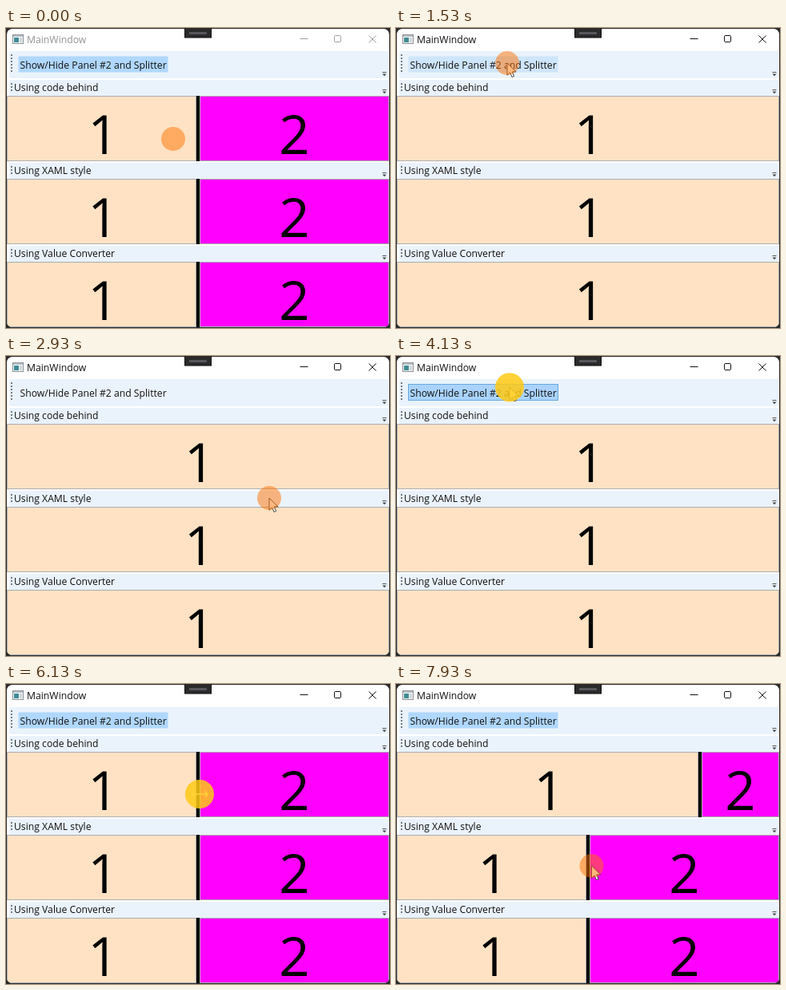
These frames come from a looping animation (480 by 376 pixels, 8000 ms). An HTML page:

```html
<!DOCTYPE html>
<html lang="en">
<head>
<meta charset="utf-8">
<title>MainWindow</title>
<style>
  html, body { margin: 0; width: 100%; height: 100%; overflow: hidden; background: #2b2b2b; }
  svg { display: block; }
  text { font: 12.2px "Open Sans", "Noto Sans", sans-serif; fill: #111; }
  .digit { font-size: 67px; text-anchor: middle; fill: #000; }
  .bar { fill: #eaf3fc; }
  .one { fill: #fee2c3; stroke: #abadb3; }
  .two { fill: #f0f; stroke: #abadb3; }
  .line { fill: none; stroke: currentColor; }
</style>
</head>
<body>
<svg id="stage" width="480" height="376" viewBox="0 0 480 376">
  <defs><clipPath id="frame"><rect x="1" y="1" width="478" height="374" rx="7"/></clipPath></defs>
  <rect width="480" height="376" fill="#2b2b2b"/>
  <g clip-path="url(#frame)">
    <rect width="480" height="376" fill="#fff"/>
    <g id="icon">
      <rect x="8.5" y="8.5" width="13" height="11" fill="#f4f6f7" stroke="#8b9196"/>
      <rect x="9" y="9" width="12" height="2" fill="#b9c0c5"/>
      <rect x="10" y="12" width="6" height="6" fill="#3f8c94"/>
      <rect x="17" y="12" width="3" height="6" fill="#cfd6da"/>
    </g>
    <text id="title" x="26" y="19">MainWindow</text>
    <g id="controls">
      <path class="line" d="M367.5 13.5h10"/>
      <rect class="line" x="410.5" y="9.5" width="8" height="8" rx="1.2"/>
      <path class="line" d="M453.5 9.5l9 9m0-9l-9 9"/>
    </g>
    <g id="bars"></g>
    <rect id="button" x="15.5" y="35.5" width="187" height="20"/>
    <text x="17.5" y="50.5">Show/Hide Panel #2 and Splitter</text>
    <g id="rows"></g>
  </g>
  <rect x="223.5" y="-1" width="33" height="13" fill="#2a2a2b" stroke="#111"/>
  <rect x="229" y="5" width="22" height="3" fill="#58585c"/>
  <g id="pointer">
    <path id="arrow" d="M0 0v15.2l3.6-3.3 2.4 5.6 2.6-1.1-2.4-5.5h4.9z" fill="#fff" stroke="#333" stroke-width=".9"/>
    <path id="resize" class="line" d="M-10 0h20M-6.5-3.5L-10 0l3.5 3.5M6.5-3.5L10 0 6.5 3.5" color="#fff" stroke-width="1.6"/>
    <path id="beam" class="line" d="M-3-7.5h6M0-7.5v15M-3 7.5h6" color="#fff" stroke-opacity=".25"/>
    <circle id="halo"/>
  </g>
</svg>
<script>
const LOOP = 8000;
const $ = id => document.getElementById(id);
const set = (el, attrs) => { for (const k in attrs) el.setAttribute(k, attrs[k]); };
const show = (el, on) => set(el, { visibility: on ? "visible" : "hidden" });

// time, x, y
const path = [
  [0, 209, 139], [200, 203, 132], [800, 141, 46], [1000, 139, 44], [1730, 139, 44],
  [2200, 236, 122], [2600, 318, 176], [2930, 329, 178], [3130, 327, 177],
  [3800, 143, 42], [4000, 142, 39], [4400, 142, 40], [4730, 164, 107],
  [5400, 238, 136], [5600, 242, 138], [6200, 242, 138], [6930, 382, 138],
  [7200, 382, 138], [7800, 248, 226], [7930, 244.5, 228], [8000, 244, 229]
];
const presses = [[1130, 1330], [4000, 4330], [6000, 7130]];
const [hideAt, showAt] = [1330, 4330];
const dragFrom = 242, splitHome = 240;

// The three sections repeat at a fixed pitch.
const PITCH = 104, PANEL_TOP = 85, PANEL_H = 81;
const labels = ["Using code behind", "Using XAML style", "Using Value Converter"];
const bars = [
  { y: 29, h: 34, dots: 6 },
  ...labels.map((label, i) => ({ y: 65 + i * PITCH, h: 20, dots: 3, label }))
];

function barMarkup({ y, h, dots, label }) {
  const end = y + h;
  const dotMarks = Array.from({ length: dots }, (_, i) =>
    `<rect x="6" y="${y + 4 + i * 4}" width="2" height="2" fill="#777d85"/>`).join("");
  return `<rect class="bar" x="4" y="${y}" width="474" height="${h}" rx="2"/>${dotMarks}
    <path d="M470.5 ${end - 7.5}h5" stroke="#555"/>
    <path d="M470.5 ${end - 5.5}h5l-2.5 2.7z" fill="#444"/>
    ${label ? `<text x="10" y="${y + 14}">${label}</text>` : ""}`;
}
$("bars").innerHTML = bars.map(barMarkup).join("");

const rows = labels.map((_, i) => {
  const g = document.createElementNS("http://www.w3.org/2000/svg", "g");
  const y = PANEL_TOP + i * PITCH, base = y + 73;
  g.innerHTML = `<rect class="one" x="1.5" y="${y + .5}" height="${PANEL_H}"/>
    <text class="digit" y="${base}">1</text>
    <g><rect class="two" y="${y + .5}" height="${PANEL_H}"/>
    <text class="digit" y="${base}">2</text>
    <rect y="${y}" width="4" height="${PANEL_H + 1}"/></g>`;
  $("rows").append(g);
  const [one, digit1, side] = g.children;
  const [two, digit2, splitter] = side.children;
  return { one, digit1, side, two, digit2, splitter };
});

function drawRow(row, split, shown) {
  const right = shown ? split - 2 : 479;
  set(row.one, { width: right - 2 });
  set(row.digit1, { x: (right + 1) / 2 + 2 });
  show(row.side, shown);
  set(row.two, { x: split + 2.5, width: 476 - split });
  set(row.digit2, { x: (split + 481) / 2 });
  set(row.splitter, { x: split - 2 });
}

function cursorAt(t) {
  const i = Math.max(1, path.findIndex(p => p[0] >= t));
  const [t0, x0, y0] = path[i - 1], [t1, x1, y1] = path[i];
  const k = (t - t0) / (t1 - t0), e = k * k * (3 - 2 * k);
  return [x0 + (x1 - x0) * e, y0 + (y1 - y0) * e];
}

function drawPointer(x, y, splits, shown, pressed) {
  const offset = y - PANEL_TOP;
  const split = splits[Math.floor(offset / PITCH)];
  const inPanel = offset > 0 && offset % PITCH < PANEL_H;
  const onSplitter = shown && inPanel && Math.abs(x - split) < 4;
  const onText = inPanel && !onSplitter && (!shown || x < split);
  set($("pointer"), { transform: `translate(${x} ${y})` });
  show($("arrow"), !onSplitter && !onText);
  show($("resize"), onSplitter);
  show($("beam"), onText);
  set($("halo"), pressed
    ? { r: 18, fill: "#ffcb14", "fill-opacity": .85 }
    : { r: 15, fill: "#ff7200", "fill-opacity": .5 });
}

function draw(t) {
  const [x, y] = cursorAt(t);
  const shown = t < hideAt || t >= showAt;
  const pressed = presses.some(([a, b]) => t >= a && t < b);
  const active = t >= presses[0][0];
  const [dragStart, dragEnd] = presses[2];
  const dragX = t < dragStart ? dragFrom : cursorAt(Math.min(t, dragEnd))[0];
  const splits = [splitHome + dragX - dragFrom, splitHome, splitHome];

  rows.forEach((row, i) => drawRow(row, splits[i], shown));

  set($("title"), { style: `fill:${active ? "#111" : "#939393"}` });
  set($("controls"), { color: active ? "#111" : "#a0a0a0" });

  const hover = x > 15 && x < 203 && y > 35 && y < 57;
  const down = hover && (pressed || shown);
  const fill = down ? "#a9d3fd" : shown ? "#b0d7fd" : hover ? "#cee5fa" : "none";
  set($("button"), { fill, stroke: down ? "#69a8df" : "none" });

  drawPointer(x, y, splits, shown, pressed);
}

// The picture advances in uneven steps of 130 and 70 ms.
const step = t => t - t % 200 + (t % 200 >= 130 ? 130 : 0);

const start = performance.now();
function tick() {
  draw(step((performance.now() - start) % LOOP));
  requestAnimationFrame(tick);
}
tick();
</script>
</body>
</html>
```
